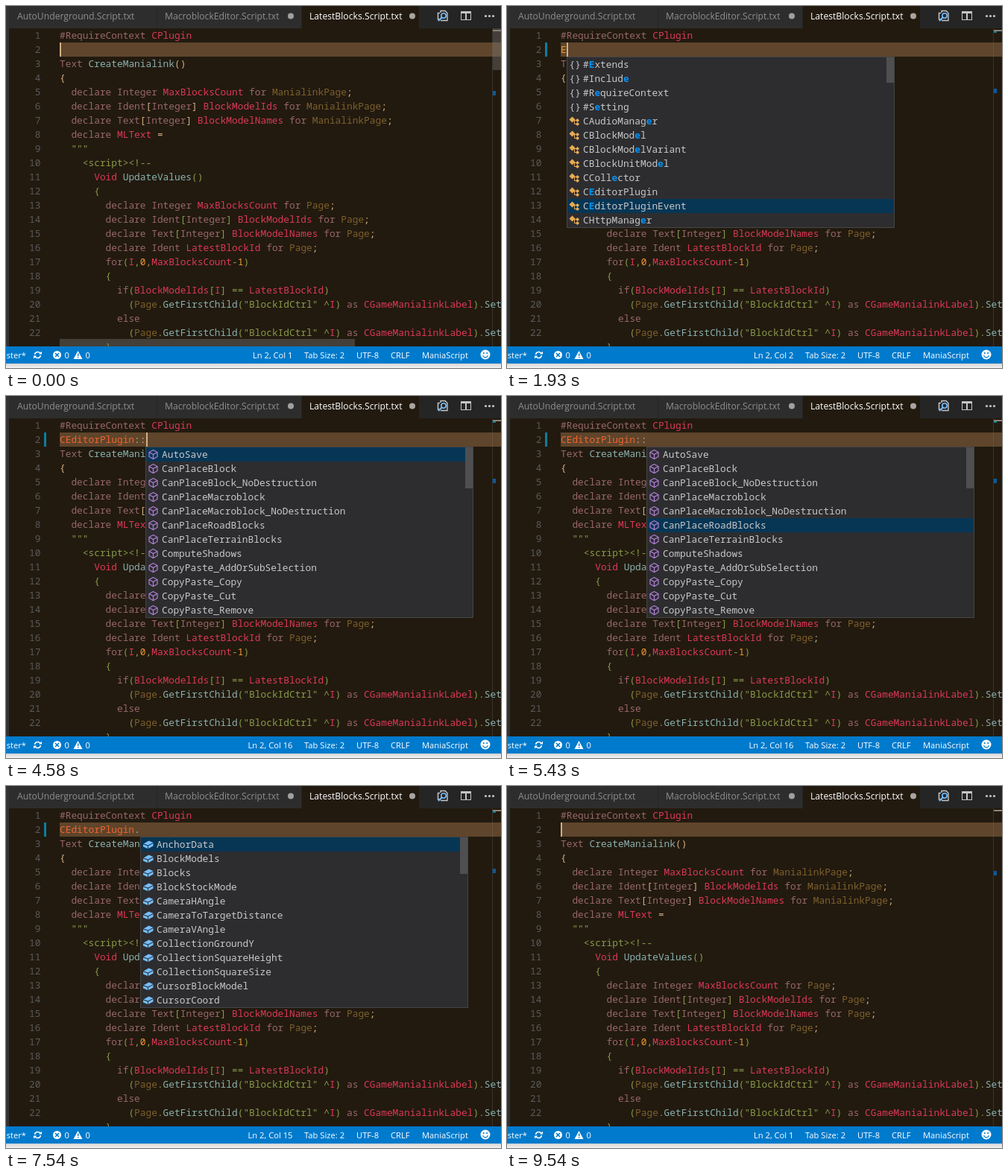
An HTML page with a canvas for the animation above (9860 ms loop, 664x486 px).

```html
<!DOCTYPE html>
<html lang="en">
<head>
<meta charset="utf-8">
<title>Editor autocomplete</title>
<style>
  html, body { margin: 0; width: 664px; height: 486px; overflow: hidden; background: #221a0f; }
  canvas { display: block; }
</style>
</head>
<body>
<canvas id="stage" width="664" height="486"></canvas>
<script>
const ctx = document.getElementById('stage').getContext('2d', { alpha: false });
const LOOP = 9860, CHAR = 7.7, ROW = 19, LEFT = 72, TOP = 30;
const MONO = '12.83px "Noto Sans Mono", monospace';
const TAB_FONT = '12.2px "Open Sans", sans-serif';
const STATUS_FONT = '11.2px "Open Sans", sans-serif';
const COLOR = {
  plain: '#d3af86', keyword: '#98676a', variable: '#dc3958', support: '#7e602c',
  func: '#8ab1b0', string: '#889b4a', number: '#f79a32', type: '#f06431'
};

const lines = `#RequireContext CPlugin

Text CreateManialink()
{
  declare Integer MaxBlocksCount for ManialinkPage;
  declare Ident[Integer] BlockModelIds for ManialinkPage;
  declare Text[Integer] BlockModelNames for ManialinkPage;
  declare MLText =
  """
    <script><!--
      Void UpdateValues()
      {
        declare Integer MaxBlocksCount for Page;
        declare Ident[Integer] BlockModelIds for Page;
        declare Text[Integer] BlockModelNames for Page;
        declare Ident LatestBlockId for Page;
        for(I,0,MaxBlocksCount-1)
        {
          if(BlockModelIds[I] == LatestBlockId)
            (Page.GetFirstChild("BlockIdCtrl" ^I) as CGameManialinkLabel).SetText
          else
            (Page.GetFirstChild("BlockIdCtrl" ^I) as CGameManialinkLabel).SetText
        }`.split('\n');

const wordColors = {};
const assign = (kind, words) => words.split(' ').forEach(w => wordColors[w] = COLOR[kind]);
assign('keyword', '#RequireContext declare for if else as Integer Ident Text');
assign('func', 'CreateManialink UpdateValues GetFirstChild SetText');
assign('support', 'ManialinkPage Page');
assign('string', 'script BlockIdCtrl');

const menus = {
  types: {
    x: 80, thumb: 34, match: /e/i,
    items: '#Extends #Include #RequireContext #Setting CAudioManager CBlockModel CBlockModelVariant CBlockUnitModel CCollector CEditorPlugin CEditorPluginEvent CHttpManager'.split(' '),
    icon: i => i < 4 ? snippetIcon : classIcon
  },
  methods: {
    x: 187, thumb: 55,
    items: 'AutoSave CanPlaceBlock CanPlaceBlock_NoDestruction CanPlaceMacroblock CanPlaceMacroblock_NoDestruction CanPlaceRoadBlocks CanPlaceTerrainBlocks ComputeShadows CopyPaste_AddOrSubSelection CopyPaste_Copy CopyPaste_Cut CopyPaste_Remove'.split(' '),
    icon: () => methodIcon
  },
  fields: {
    x: 180, thumb: 49,
    items: 'AnchorData BlockModels Blocks BlockStockMode CameraHAngle CameraToTargetDistance CameraVAngle CollectionGroundY CollectionSquareHeight CollectionSquareSize CursorBlockModel CursorCoord'.split(' '),
    icon: () => fieldIcon
  }
};

const CLASS = 'CEditorPlugin';
const events = [];
const at = (time, change) => events.push([time, change]);
const moveDown = (start, gap, from, to) => {
  for (let sel = from; sel <= to; sel++) at(start + (sel - from) * gap, { sel });
};

at(0, { text: '', menu: null, sel: 0, caret: true });
at(230, { caret: false });
at(620, { text: 'E', menu: 'types', sel: 0, caret: true });
moveDown(746, 126.2, 1, 8);
at(1124, { caret: false });
at(1629, { caret: true });
moveDown(1780, 150, 9, 10);
at(2250, { caret: false });
at(2420, { sel: 9 });
at(2950, { caret: true });
at(3180, { text: CLASS, menu: null });
at(3640, { caret: false });
at(4040, { text: CLASS + ':', caret: true });
at(4420, { text: CLASS + '::' });
at(4546, { menu: 'methods', sel: 0 });
at(4920, { caret: false });
moveDown(4925, 126, 1, 5);
at(5660, { sel: 6 });
at(5830, { caret: true });
at(6210, { text: CLASS + ':', menu: null });
at(6590, { text: CLASS });
at(6990, { text: CLASS + '.' });
at(7070, { menu: 'fields', sel: 0 });
at(7540, { caret: false });
moveDown(7655, 115, 1, 6);
at(8000, { caret: true });
at(8530, { text: CLASS, menu: null });
at(8680, { text: '' });
at(8990, { caret: false });
at(9540, { caret: true });
events.sort((a, b) => a[0] - b[0]);

function stateAt(time) {
  const state = {};
  for (const [start, change] of events) if (start <= time) Object.assign(state, change);
  return state;
}

function rect(x, y, w, h, color) {
  ctx.fillStyle = color;
  ctx.fillRect(x, y, w, h);
}

function label(str, x, y, color, font, align = 'left') {
  ctx.font = font;
  ctx.fillStyle = color;
  ctx.textAlign = align;
  ctx.fillText(str, x, y);
}

function shape(points, color, filled, width = 1) {
  ctx.beginPath();
  points.forEach(([x, y]) => ctx.lineTo(x, y));
  if (filled) {
    ctx.closePath();
    ctx.fillStyle = color;
    ctx.fill();
  } else {
    ctx.strokeStyle = color;
    ctx.lineWidth = width;
    ctx.stroke();
  }
}

function ring(x, y, r, color, width = 1, from = 0, to = Math.PI * 2) {
  ctx.beginPath();
  ctx.arc(x, y, r, from, to);
  ctx.strokeStyle = color;
  ctx.lineWidth = width;
  ctx.stroke();
}

function dot(x, y, r, color) {
  ctx.beginPath();
  ctx.arc(x, y, r, 0, Math.PI * 2);
  ctx.fillStyle = color;
  ctx.fill();
}

// Menu icons are drawn around their own centre.
function snippetIcon() {
  label('{}', -7, 4, '#c5c5c5', MONO);
}

function classIcon() {
  const diamond = (x, y, r) =>
    shape([[x - r, y], [x, y - r], [x + r, y], [x, y + r]], '#e8ab53', true);
  shape([[-2, -1], [3, -1]], '#e8ab53');
  shape([[0, -1], [0, 4], [3, 4]], '#e8ab53');
  diamond(-3, -2, 4);
  diamond(4, -1, 2.6);
  diamond(4, 4, 2.6);
}

function methodIcon() {
  const c = '#b180d7';
  shape([[0, -6], [5.5, -3], [5.5, 3], [0, 6], [-5.5, 3], [-5.5, -3], [0, -6]], c, false, 1.2);
  shape([[-5.5, -3], [0, 0], [5.5, -3]], c, false, 1.2);
  shape([[0, 0], [0, 6]], c, false, 1.2);
}

function fieldIcon() {
  const c = '#75beff';
  shape([[-6, -1], [1, -5], [7, -2.5], [0, 1]], c, true);
  shape([[-6.5, 0], [-0.5, 2], [-0.5, 5.5], [-6.5, 3]], c, true);
  shape([[0.5, 2], [7, -1.5], [7, 2], [0.5, 5.5]], c, true);
}

function drawCode() {
  lines.forEach((line, i) => {
    const y = TOP + i * ROW + 14;
    if (i < 22) label(i + 1, 46.5, y, '#5a5a5a', MONO, 'right');
    for (const part of line.matchAll(/#?\w+|[^\w\s#]/g)) {
      const token = part[0];
      let color = wordColors[token];
      if (!color) {
        if (/^\d/.test(token)) color = COLOR.number;
        else if (/\w/.test(token)) color = COLOR.variable;
        else color = i >= 8 && token !== ';' ? COLOR.string : COLOR.plain;
      }
      label(token, LEFT + part.index * CHAR, y, color, MONO);
    }
  });
}

function drawActiveLine({ text, caret }) {
  const y = TOP + ROW;
  if (text) rect(51, y, 3, ROW, '#0c7d9d');
  const name = text.match(/^\w*/)[0];
  label(name, LEFT, y + 14, name === 'E' ? COLOR.number : COLOR.type, MONO);
  label(text.slice(name.length), LEFT + name.length * CHAR, y + 14, COLOR.plain, MONO);
  if (caret) rect(Math.round(LEFT + text.length * CHAR), y, 2, ROW, COLOR.plain);
}

function drawRuler(time, { text }) {
  const fade = Math.max(0, Math.min(1, 1 - (time - 620) / 800));
  rect(652, TOP, 1, 427, 'rgba(127,127,127,0.25)');
  rect(653, text ? 111 : 114, 4, 6, '#0a5a9c');
  if (text) rect(653, 32, 4, 4, '#0c7d9d');
  rect(653, 32, 11, 2, '#8c8378');
  if (fade) {
    const color = `rgba(121,121,121,${0.4 * fade})`;
    rect(653, TOP, 11, 56, color);
    rect(LEFT, 447, 396, 10, color);
  }
}

function drawMenu({ menu, sel }) {
  if (!menu) return;
  const { x, items, icon, match, thumb } = menus[menu];
  rect(x, 68, 440, 230, '#454545');
  rect(x + 1, 69, 438, 228, '#2d2d30');
  rect(x + 1, 69 + sel * ROW, 438, ROW, '#073655');
  items.forEach((item, i) => {
    const y = 69 + i * ROW;
    ctx.save();
    ctx.translate(x + 10.5, y + 9.5);
    icon(i)();
    ctx.restore();
    const hit = match ? item.search(match) : -1;
    [...item].forEach((ch, n) => label(ch, x + 22 + n * CHAR, y + 14,
      n === hit ? '#0097fb' : '#c8c8c8', n === hit ? 'bold ' + MONO : MONO));
  });
  rect(x + 429, 69, 10, thumb, '#4f4f51');
}

function drawTabs() {
  rect(0, 0, 664, TOP, '#252526');
  rect(4, 0, 198, TOP, '#2d2d2d');
  rect(203, 0, 193, TOP, '#2d2d2d');
  rect(397, 0, 157, TOP, '#221a0f');
  label('AutoUnderground.Script.txt', 15, 18, '#8f8f8f', TAB_FONT);
  label('MacroblockEditor.Script.txt', 213, 18, '#8f8f8f', TAB_FONT);
  label('LatestBlocks.Script.txt', 407, 18, '#ffffff', TAB_FONT);
  dot(382, 13.5, 4, '#a0a0a0');
  dot(545, 13.5, 4, '#a8a5a1');

  const c = '#c5c5c5';
  shape([[583, 18], [579.5, 18], [579.5, 9.5], [582, 9.5]], c, false, 1.5);
  shape([[583, 9], [583, 6.5], [589, 6.5], [592, 9.5], [592, 19.5], [583, 19.5]], c, false, 1.4);
  ring(587, 13, 3.2, '#75beff', 1.6);
  shape([[584.5, 15.5], [580, 20]], '#75beff', false, 2);
  ctx.strokeStyle = c;
  ctx.lineWidth = 1;
  ctx.strokeRect(610.5, 7.5, 13, 11);
  rect(610, 7, 14, 3, c);
  rect(616, 7, 2, 12, c);
  for (let i = 0; i < 3; i++) dot(643.5 + i * 5, 13.5, 1.6, c);
}

function drawStatus({ text }) {
  const white = '#ffffff';
  const write = (str, x, align) => label(str, x, 472.5, white, STATUS_FONT, align);
  rect(0, 457, 664, 23, '#007acc');
  const shadow = ctx.createLinearGradient(0, 480, 0, 486);
  shadow.addColorStop(0, '#d2d2d2');
  shadow.addColorStop(1, '#f4f4f4');
  rect(0, 480, 664, 6, shadow);

  write('master*', 27, 'right');
  ring(42.5, 468.5, 4, white, 1.6, Math.PI * 1.05, Math.PI * 1.85);
  ring(42.5, 468.5, 4, white, 1.6, Math.PI * 0.05, Math.PI * 0.85);
  shape([[44, 467.5], [48, 467.5], [48, 463.5]], white, true);
  shape([[41, 469.5], [37, 469.5], [37, 473.5]], white, true);
  dot(68.5, 468.5, 5.5, white);
  shape([[66, 466], [71, 471]], '#007acc', false, 1.6);
  shape([[71, 466], [66, 471]], '#007acc', false, 1.6);
  write('0', 78.5);
  shape([[96.5, 463], [102.5, 474], [90.5, 474]], white, true);
  rect(96, 466.5, 1.4, 3.5, '#007acc');
  rect(96, 471, 1.4, 1.4, '#007acc');
  write('0', 106.5);
  write('Ln 2, Col ' + (text.length + 1), 384.5, 'right');
  write('Tab Size: 2', 400);
  write('UTF-8', 470);
  write('CRLF', 516);
  write('ManiaScript', 558);
  dot(643, 468, 6.5, white);
  dot(640.8, 466, 1.1, '#007acc');
  dot(645.2, 466, 1.1, '#007acc');
  ring(643, 468.5, 3.4, '#007acc', 1.2, 0.2, Math.PI - 0.2);
}

function draw(now) {
  const time = now % LOOP;
  const state = stateAt(time);
  rect(0, 0, 664, 486, '#221a0f');
  rect(LEFT, TOP + ROW, 592, ROW, '#5e452b');
  drawCode();
  drawActiveLine(state);
  drawRuler(time, state);
  drawMenu(state);
  drawTabs();
  rect(0, 0, 4, 457, '#333333');
  drawStatus(state);
}

const begin = performance.now();
function tick() {
  draw(performance.now() - begin);
  requestAnimationFrame(tick);
}
tick();
</script>
</body>
</html>
```
